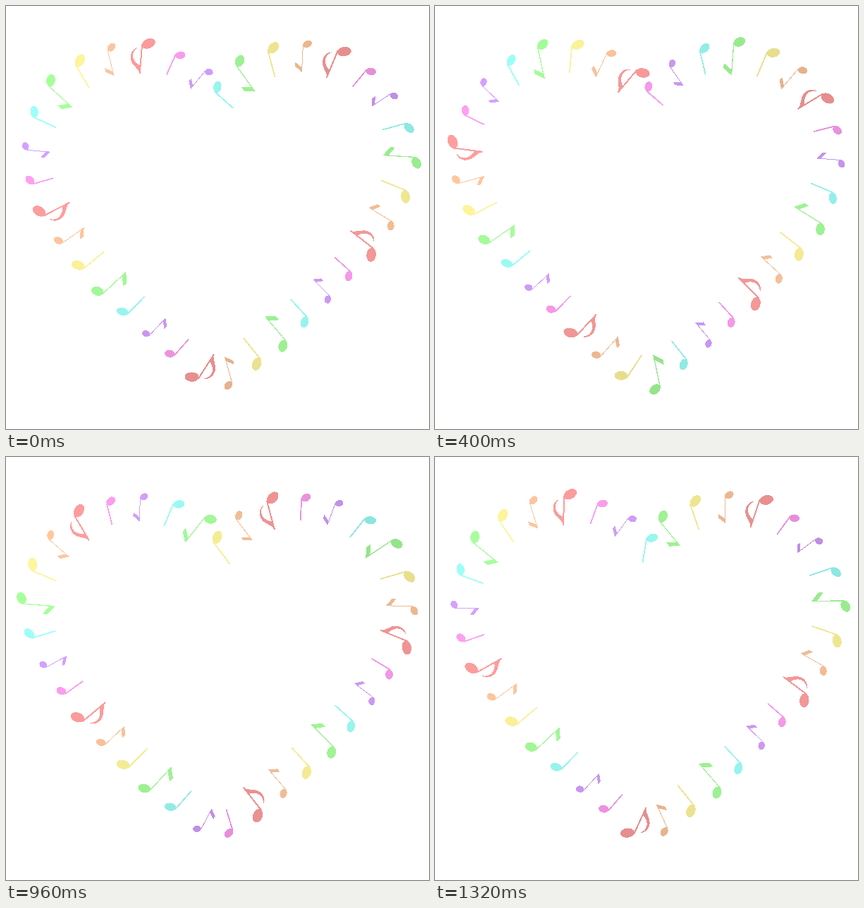
An HTML page that plays this animation: 600x600 px, repeating every 1.36 s.

```html
<!DOCTYPE html>
<html lang="en">
<head>
<meta charset="utf-8">
<title>Heart of notes</title>
<style>
  html, body { margin: 0; height: 100%; overflow: hidden; background: #fff; }
  svg { display: block; width: 100vw; height: 100vh; }
</style>
</head>
<body>
<svg id="stage" viewBox="0 0 600 600" shape-rendering="crispEdges">
  <path id="heart" fill="none" d="M306.5 131 C336 94 368 71 420 71 C498 71 562 136 562 215
    C562 311 414 446 298 531 C190 443 42 306 42 212 C42 134 109 71 190 71 C240 71 275 99 306.5 131"/>
</svg>
<script>
const LOOP = 1360, STEP = 40, COUNT = 35;
const stage = document.getElementById('stage');
const heart = document.getElementById('heart');
const length = heart.getTotalLength();

// rx, ry: head radii; top: stem height above the head; beam: size of a straight flag;
// lag: distance behind the regular spacing
const kinds = [
  { rgb: [157, 255, 248], rx: 8.3, ry: 5.6, top: 37, stem: 1.8 },
  { rgb: [166, 255, 155], rx: 8.7, ry: 6.3, top: 48, stem: 1.3, beam: 1 },
  { rgb: [255, 245, 155], rx: 9.4, ry: 6.4, top: 40.5, stem: 1.8 },
  { rgb: [255, 199, 158], rx: 6.8, ry: 4.9, top: 40, stem: 1, beam: 0.83, lag: 1 },
  { rgb: [255, 158, 158], rx: 10, ry: 6.7, top: 44, stem: 2, curl: true, lag: -2 },
  { rgb: [255, 159, 242], rx: 7.2, ry: 5.3, top: 33, stem: 1.8 },
  { rgb: [213, 160, 255], rx: 5.8, ry: 4.6, top: 35, stem: 1, beam: 0.75, lag: 1 }
];

// brightness at even distances along the heart
const shades = [.965, .92, .89, .935, .96, .955, .89, .95, .985, 1, 1, .985];

function add(parent, tag, attributes) {
  const node = document.createElementNS('http://www.w3.org/2000/svg', tag);
  for (const name in attributes) node.setAttribute(name, attributes[name]);
  return parent.appendChild(node);
}

function createNote(kind) {
  const { rx, ry, top, stem, beam, curl } = kind;
  const note = add(stage, 'g', {});
  const body = add(note, 'g', { transform: `translate(0 ${(top - ry - 0.8) / 2})` });
  const x = rx * 0.9;
  add(body, 'ellipse', { rx, ry, transform: 'rotate(-31)' });
  add(body, 'path', { d: `M${x - stem / 2} -2 h${stem} V${-top} h${-stem} Z` });
  if (beam) {
    add(body, 'path', {
      d: `M${x} ${-top} l${12 * beam} ${9.5 * beam} v${7 * beam} l${-12 * beam} ${-9 * beam} Z`
    });
  }
  if (curl) {
    add(body, 'path', {
      d: 'M8.5 -44 C13 -34 24 -32 24 -20 C24 -13 20 -9 16 -7.5 C22 -13 22.5 -21 18 -26 C15 -30 12 -31 9.5 -32 Z'
    });
  }
  return note;
}

const notes = Array.from({ length: COUNT }, (_, i) => {
  const kind = kinds[i % kinds.length];
  return { kind, node: createNote(kind) };
});

const wrap = (value, size) => (value % size + size) % size;
const pointAt = distance => heart.getPointAtLength(wrap(distance, length));

function shadeAt(distance) {
  const place = wrap(distance / length, 1) * shades.length;
  const i = Math.floor(place);
  const from = shades[i % shades.length], to = shades[(i + 1) % shades.length];
  return from + (to - from) * (place - i);
}

function draw(time) {
  const shift = 0.17 + kinds.length * time / LOOP;
  notes.forEach(({ kind, node }, i) => {
    const distance = wrap((i + shift) * length / COUNT - (kind.lag || 0), length);
    // notes turn slowly round the lower tip and sharply at the cleft
    const part = distance / length;
    const reach = part > 0.27 && part < 0.73 ? 42 : 8;
    const ahead = pointAt(distance + reach), behind = pointAt(distance - reach);
    const angle = Math.atan2(behind.y - ahead.y, behind.x - ahead.x) * 180 / Math.PI;
    const { x, y } = pointAt(distance);
    const shade = shadeAt(distance);
    node.setAttribute('transform', `translate(${x} ${y}) rotate(${angle})`);
    node.setAttribute('fill', `rgb(${kind.rgb.map(v => Math.round(v * shade))})`);
  });
}

const start = performance.now();
function tick() {
  const time = (performance.now() - start) % LOOP;
  draw(Math.floor(time / STEP) * STEP);
  requestAnimationFrame(tick);
}
tick();
</script>
</body>
</html>
```
